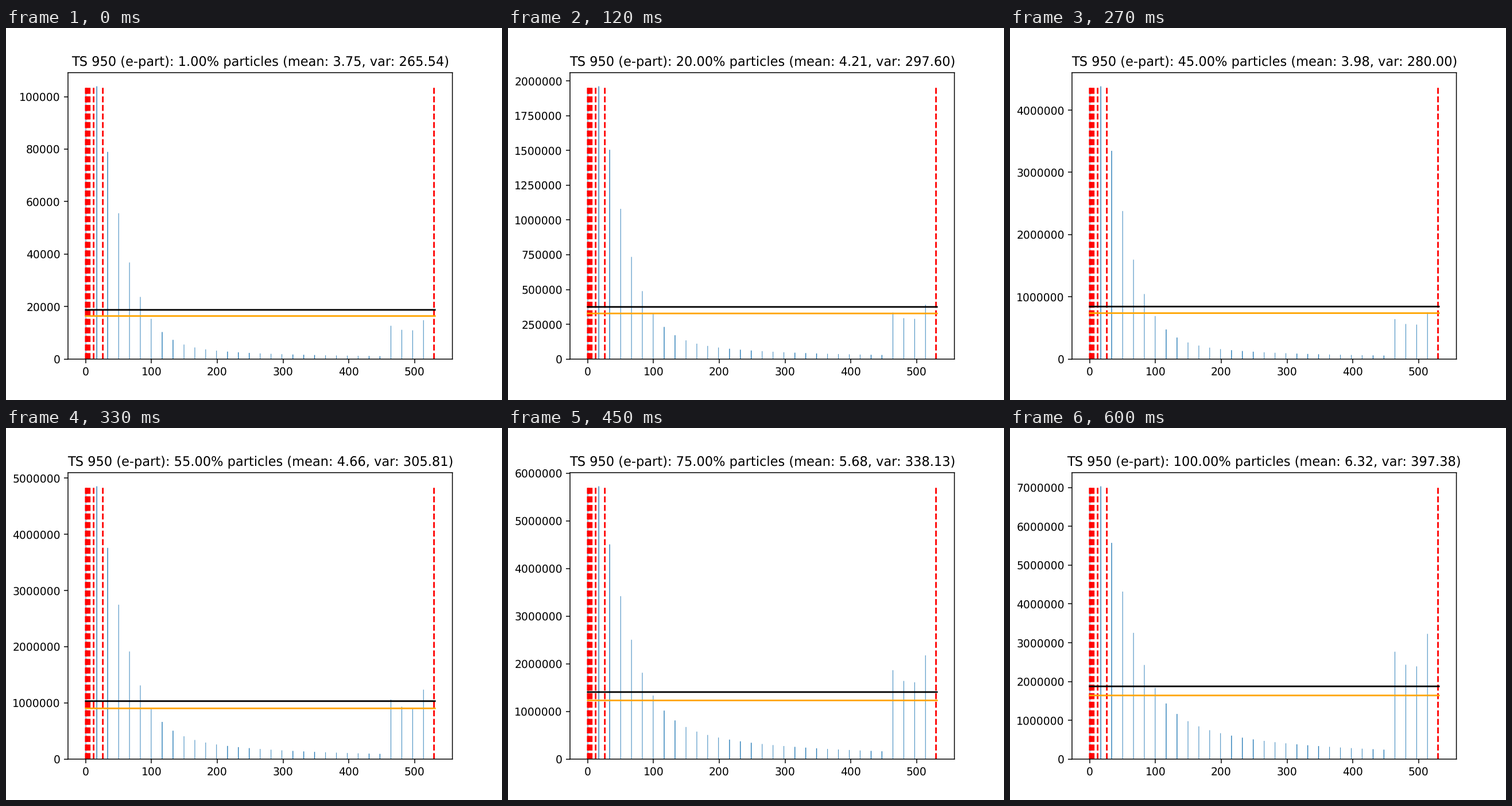
These frames come from a looping animation (864 by 648 pixels, 0.63 s). A matplotlib script:

```python
import numpy as np
import matplotlib.pyplot as plt
from matplotlib.animation import FuncAnimation

FRAMES = 21
BINS = 32
X_LO, X_HI = -0.4, 531.0
PER_PERCENT = 18750          # ideal load per percent of particles
CUTS = [0, 1, 2, 4, 6, 12, 26, 529.6]

# Statistics known at these shares of particles (in percent)
SHARE = [1, 15, 30, 45, 65, 85, 100]
MEAN = [3.75, 4.31, 4.01, 3.98, 5.34, 6.02, 6.32]
VAR = [265.54, 302.34, 288.13, 280.00, 331.61, 344.66, 397.38]
PEAK = [103936, 1441000, 3002000, 4383000, 5325000, 6122000, 7033000]


def profile(mean):
    """Bar heights relative to the tallest bar: a bulk, a long tail, a pile-up."""
    i = np.arange(1, BINS)
    spread = 1.6 * mean - 4.15
    tail = spread * (i + 4.0) ** -1.5
    steep = 0.655 - 0.06 * spread
    bulk = (1 + steep) / (1 + steep * 1.9 ** (i - 1))
    rel = tail + (1 - tail[0]) * bulk
    rel[-4:] = spread * np.array([0.066, 0.058, 0.057, 0.077])
    return np.concatenate([[0.98], rel])


# Soft edges at exact positions, and evenly spaced letters
plt.rcParams.update({"font.family": "DejaVu Sans",
                     "path.snap": False, "text.hinting": "none"})
fig, ax = plt.subplots(figsize=(6.4, 4.8), dpi=135)

margin = 0.05 * (X_HI - X_LO)
ax.set_xlim(X_LO - margin, X_HI + margin)
pixel = (X_HI - X_LO + 2 * margin) / (0.775 * 864)

# Bar edges are rounded to a 300 dpi grid, so widths alternate
edge = 308.06 + 42.1605 * np.arange(BINS)
left, right = (np.round(e) * 135 / 300 for e in (edge, edge + 2.4))
bars = ax.bar(X_LO - margin + (left - 108) * pixel, np.ones(BINS),
              width=(right - left) * pixel, align="edge",
              color="#1f77b4", linewidth=0)
cuts = [ax.plot([x, x], [0, 1], "r--", lw=1.5)[0] for x in CUTS]
ideal, = ax.plot([0, X_HI], [0, 0], color="black", lw=1.5)
lower, = ax.plot([0, X_HI], [0, 0], color="orange", lw=1.5)
title = ax.set_title("")
ax.ticklabel_format(style="plain", axis="y", useOffset=False)


def update(frame):
    share = max(1, 5 * frame)
    mean, var, peak = (np.interp(share, SHARE, v) for v in (MEAN, VAR, PEAK))
    for bar, h in zip(bars, peak * profile(mean)):
        bar.set_height(h)
    for cut in cuts:
        cut.set_ydata([0, peak])
    load = PER_PERCENT * share
    ideal.set_ydata([load, load])
    lower.set_ydata([load * 7 / 8] * 2)
    ax.set_ylim(0, peak * 1.05)
    title.set_text(f"TS 950 (e-part): {share:.2f}% particles "
                   f"(mean: {mean:.2f}, var: {var:.2f})")
    return []


anim = FuncAnimation(fig, update, frames=FRAMES, interval=30,
                     repeat=True, repeat_delay=0, blit=False)
plt.show()
```
